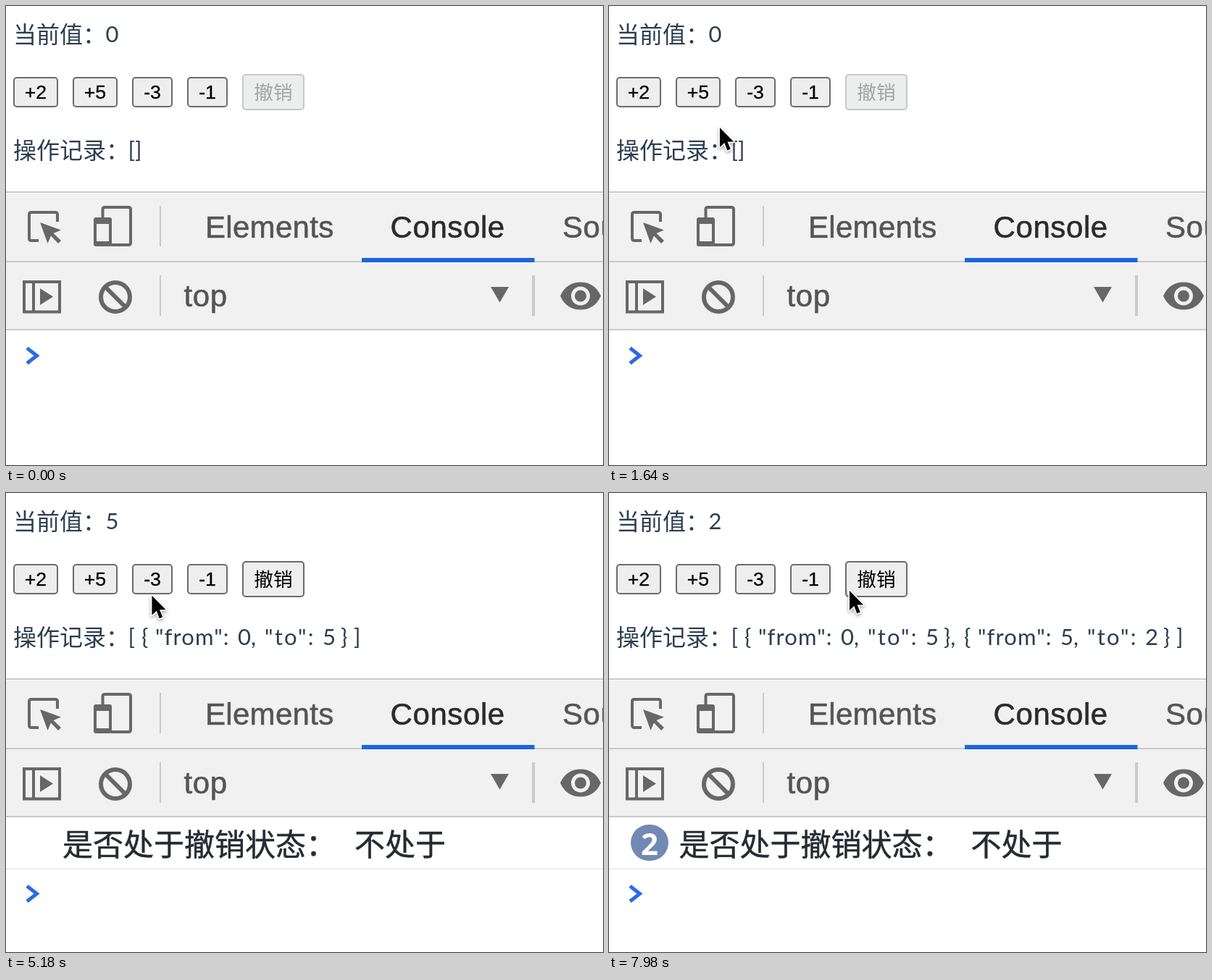
An HTML page that plays this animation: 824x634 px, repeating every 8 s.

```html
<!DOCTYPE html>
<html lang="zh-CN">
<head>
<meta charset="utf-8">
<title>撤销</title>
<style>
html, body { margin: 0; width: 100%; height: 100%; overflow: hidden; background: #fff; }
svg { display: block; width: 100vw; height: 100vh; }
text { white-space: pre; }
.cjk { font-family: "Noto Sans CJK SC", "Noto Sans CJK", "Noto Sans CJK JP", sans-serif; }
.page { font-size: 32px; fill: #2c3e50; }
.num { font: 31px Lato, sans-serif; fill: #2c3e50; }
.from { letter-spacing: 1.1px; }
.to { letter-spacing: 2.2px; }
.btn { font: 26.67px "Liberation Sans", sans-serif; text-anchor: middle; stroke: #000; stroke-width: .3; }
.undo { font-size: 26.67px; text-anchor: middle; }
.tool { font: 42px "Liberation Sans", sans-serif; letter-spacing: .6px; fill: #555; stroke: #555; stroke-width: .6; }
.dark { fill: #2b2b2b; stroke: #2b2b2b; }
.log { font-size: 42px; fill: #262b31; stroke: #262b31; stroke-width: .5; }
.badge { font: bold 42px "Open Sans", sans-serif; text-anchor: middle; fill: #fff; }
.line { fill: none; stroke: #676767; stroke-width: 4; }
.solid { fill: #676767; }
.rule { fill: #cacaca; }
#tip { filter: drop-shadow(0 2px 4px rgba(0, 0, 0, .28)); }
#cursor { filter: drop-shadow(0 2px 2px rgba(0, 0, 0, .35)); }
#cursor path { stroke: #fff; stroke-width: 3.4; paint-order: stroke; stroke-linejoin: round; }
</style>
</head>
<body>
<svg viewBox="0 0 824 634" preserveAspectRatio="none">
  <rect width="824" height="634" fill="#fff"/>
  <text class="cjk page" x="10" y="51">当前值：</text>
  <text id="value" class="num" x="137.5" y="50"></text>
  <g id="buttons"></g>
  <rect id="undoBox" x="327" y="95" width="84" height="48" rx="4" stroke-width="2"/>
  <text id="undoText" class="cjk undo" x="369" y="129">撤销</text>
  <text class="cjk page" x="10" y="211">操作记录：</text>
  <g id="record"></g>

  <rect y="259" width="824" height="188" fill="#f1f1f1"/>
  <rect id="tabHover" x="245" y="259" width="246" height="90" fill="#eaeaea"/>
  <g class="rule">
    <rect y="256" width="824" height="2"/>
    <rect y="352" width="824" height="2"/>
    <rect y="446" width="824" height="2"/>
    <rect x="212" y="276" width="2" height="56"/>
    <rect x="212" y="372" width="2" height="56"/>
    <rect x="726" y="372" width="4" height="56"/>
  </g>
  <rect x="491" y="348" width="238.5" height="6" fill="#1a66e0"/>
  <text class="tool" x="275" y="320" style="letter-spacing:.3px">Elements</text>
  <text class="tool dark" x="530.5" y="320">Console</text>
  <text class="tool" x="768" y="320">Sources</text>
  <text class="tool" x="245.5" y="415">top</text>

  <path class="line" d="M45 324H35q-3 0-3-3V288q0-3 3-3H68q3 0 3 3V298"/>
  <path class="solid" d="M47 299L76 309.5L65.5 314L76 324L72 328L62 317.5L57.5 328Z"/>
  <path class="line" d="M133.5 293V281q0-3 3-3H169q3 0 3 3V327q0 3-3 3H145"/>
  <rect class="solid" x="121" y="292" width="25" height="40" rx="3"/>
  <rect x="125" y="301" width="17" height="24" fill="#f1f1f1"/>
  <path class="line" d="M25 381H74V422.500H25ZM38 381V422"/>
  <path class="solid" d="M47 390L65 401.5L47 413Z"/>
  <g class="line" style="stroke-width:6">
    <circle cx="151" cy="402" r="20"/>
    <path d="M137 388L165 416"/>
  </g>
  <path class="solid" d="M669 388H694L681.5 409.500Z"/>
  <path class="solid" d="M765 400.500C771 387 781 381.500 793 381.500S815 387 821 400.500C815 414 805 419.500 793 419.500S771 414 765 400.500Z"/>
  <circle cx="793" cy="400.5" r="10.5" class="solid" stroke="#f1f1f1" stroke-width="5"/>

  <g id="log">
    <rect y="518" width="824" height="2" fill="#ededed"/>
    <g id="message">
      <text class="cjk log" x="78" y="501">是否处于撤销状态：</text>
      <text class="cjk log" x="481" y="501">不处于</text>
    </g>
    <g id="count">
      <rect x="30" y="458" width="52" height="50" rx="25" fill="#7289b4"/>
      <text class="badge" x="56" y="500">2</text>
    </g>
  </g>
  <path id="prompt" d="M29 472.500L42.500 483L29 493.500" fill="none" stroke="#2d6ae3" stroke-width="5"/>

  <g id="tip">
    <rect x="229" y="453" width="498" height="88" rx="6" fill="#eef0f0" stroke="#bfc1c1" stroke-width="1.500"/>
    <text class="tool dark" x="259" y="513">JavaScript context: top</text>
  </g>
  <g id="cursor">
    <path id="arrow" d="M1 1V28L7.300 22L11.300 32.500L15.800 30.600L11.600 20.600H20.200Z"/>
    <path id="resize" d="M0-14L9-4H2.500V4H9L0 14L-9 4H-2.500V-4H-9Z"/>
  </g>
</svg>
<script>
const LOOP = 8000;
const $ = id => document.getElementById(id);
const show = (id, on) => $(id).setAttribute('display', on ? 'inline' : 'none');
const set = (el, attrs) => { for (const k in attrs) el.setAttribute(k, attrs[k]); };
const within = (t, a, b) => t >= a && t < b;

function add(parent, tag, attrs, text = '') {
  const el = document.createElementNS('http://www.w3.org/2000/svg', tag);
  set(el, attrs);
  el.textContent = text;
  return parent.appendChild(el);
}

const buttons = [
  { label: '+2', x: 10, w: 62 },
  { label: '+5', x: 92, w: 62, press: [2900, 3320] },
  { label: '-3', x: 174, w: 56, press: [6020, 6440] },
  { label: '-1', x: 250, w: 56 }
];
for (const b of buttons) {
  b.box = add($('buttons'), 'rect', { x: b.x + 1, y: 99, width: b.w - 2, height: 40, rx: 4, 'stroke-width': 2 });
  add($('buttons'), 'text', { class: 'btn', x: b.x + b.w / 2, y: 128 }, b.label);
}

// The history list, one group per state
const states = [0, 1, 2].map(() => add($('record'), 'g', {}));
const put = (g, x, s, cls = '') => add(g, 'text', { class: 'num ' + cls, x, y: 210 }, s);
function entry(g, dx, from, to, close) {
  put(g, 187 + dx, '{');
  put(g, 206 + dx, '"from":', 'from');
  put(g, 320 + dx, from + ',');
  put(g, 357 + dx, '"to":', 'to');
  put(g, 437 + dx, to);
  put(g, 462 + dx, close);
}
put(states[0], 168.5, '[]');
put(states[1], 168.5, '[');
entry(states[1], 0, 0, 5, '}');
put(states[1], 480, ']');
put(states[2], 168.5, '[');
entry(states[2], 0, 0, 5, '},');
entry(states[2], 303, 5, 2, '}');
put(states[2], 783, ']');

// Pointer path: time, x, y
const path = [
  [360, 850, 440], [680, 610, 390], [820, 509, 346], [1120, 458, 310], [1220, 458, 310],
  [1640, 152, 167], [1960, 147, 154], [2050, 147, 154], [2380, 139, 123], [4270, 139, 123],
  [4300, 142, 125], [4700, 172, 139], [5040, 200, 142], [5130, 200, 142], [5420, 205, 126],
  [6850, 205, 126], [7250, 232, 140.5], [7660, 257, 140.5], [7980, 331, 134], [8000, 331, 134]
];
const slope = (i, k) => i < 0 || i > path.length - 2 ? 0
  : (path[i + 1][k] - path[i][k]) / (path[i + 1][0] - path[i][0]);
function tangent(i, k) {
  const a = slope(i - 1, k), b = slope(i, k);
  return a * b > 0 ? 2 * a * b / (a + b) : 0;
}
// Monotone cubic, so the pointer never overshoots a rest
function pointer(t) {
  let i = 0;
  while (i < path.length - 2 && t >= path[i + 1][0]) i++;
  const h = path[i + 1][0] - path[i][0];
  const u = Math.min(1, Math.max(0, (t - path[i][0]) / h));
  const v = u * u * (3 - 2 * u);
  return [1, 2].map(k => path[i][k] * (1 - v) + path[i + 1][k] * v
    + h * u * (1 - u) * ((1 - u) * tangent(i, k) - u * tangent(i + 1, k)));
}

function draw(t) {
  const [x, y] = pointer(t);
  const step = t < 3320 ? 0 : t < 6440 ? 1 : 2;
  const logs = t < 3340 ? 0 : step;
  const moving = t >= 400;
  const resizing = within(t, 780, 880);

  $('value').textContent = [0, 5, 2][step];
  states.forEach((g, i) => g.setAttribute('display', i === step ? 'inline' : 'none'));

  for (const b of buttons) {
    const over = moving && x >= b.x && x <= b.x + b.w && y >= 98 && y <= 140;
    const down = b.press && within(t, ...b.press);
    set(b.box, {
      fill: down ? '#f5f5f5' : over ? '#e0e0e0' : '#eeeeee',
      stroke: down ? '#8d8d8d' : over ? '#4a4a4a' : '#6b6b6b'
    });
  }
  set($('undoBox'), { fill: step ? '#eeeeee' : '#eceeee', stroke: step ? '#6b6b6b' : '#c6c8c8' });
  $('undoText').setAttribute('fill', step ? '#000' : '#a3a5a5');

  show('log', logs > 0);
  show('count', logs > 1);
  $('message').setAttribute('transform', `translate(${logs > 1 ? 18.5 : 0} 0)`);
  $('prompt').setAttribute('transform', `translate(0 ${logs ? 70.5 : 0})`);

  show('tip', within(t, 560, 900));
  show('tabHover', t > 880 && t < 1960 && x > 245 && x < 491 && y > 259 && y < 349);
  show('cursor', moving);
  show('arrow', !resizing);
  show('resize', resizing);
  $('cursor').setAttribute('transform', `translate(${x.toFixed(2)} ${y.toFixed(2)})`);
}

const start = performance.now();
function tick() {
  draw((performance.now() - start) % LOOP);
  requestAnimationFrame(tick);
}
tick();
</script>
</body>
</html>
```
